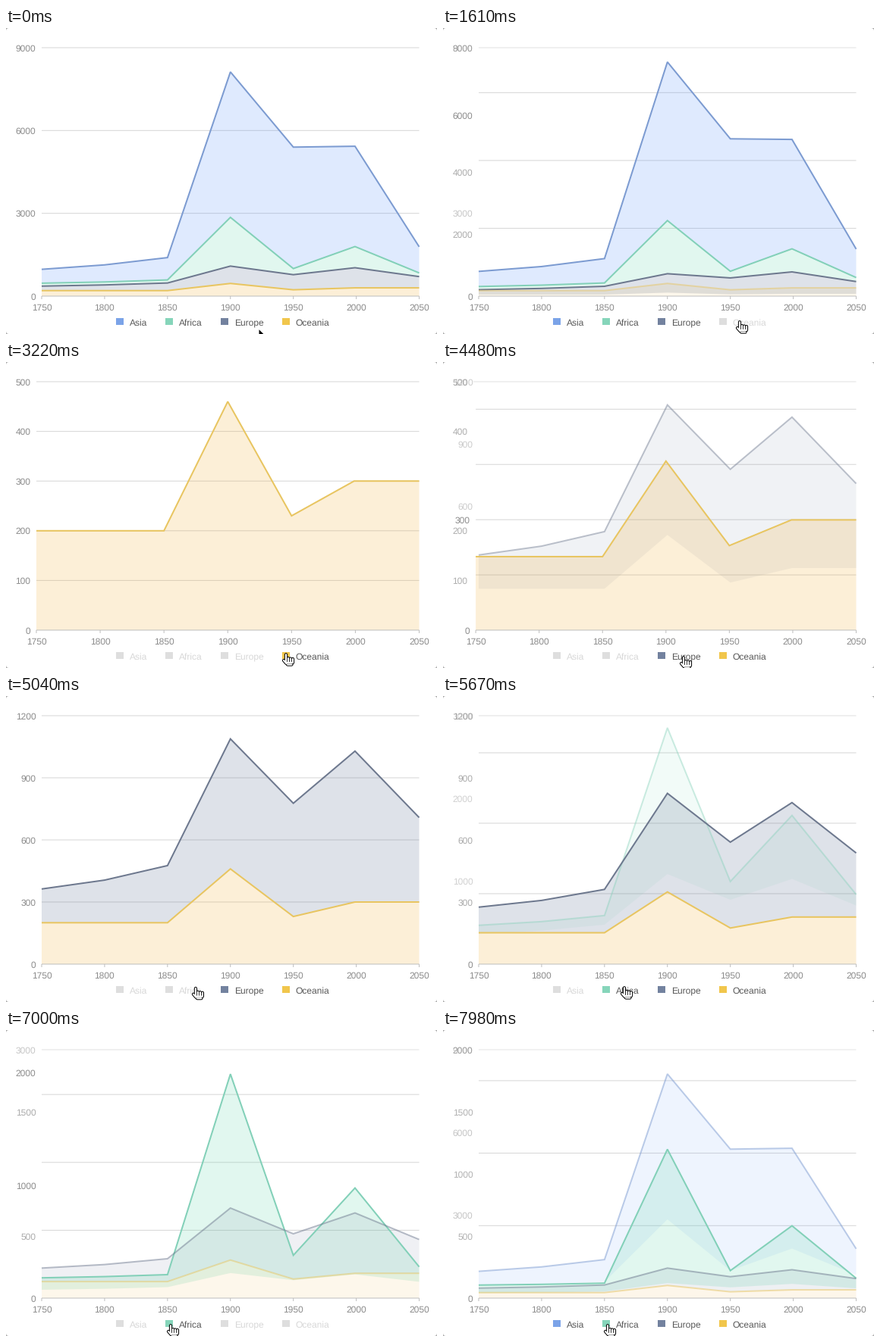
Recreate the animation shown at these times as a matplotlib script. Size 568 px wide and 404 px high, loop 8 s.

```python
import matplotlib.pyplot as plt
import numpy as np
from matplotlib.animation import FuncAnimation
from matplotlib.patches import FancyBboxPatch, Polygon, Rectangle

W, H, DPI = 568, 404, 100
PX = 72 / DPI
LOOP, INTERVAL, STEP = 8000, 20, 70
TOP, BOTTOM, RIGHT = 26, 354, 544.5
MORPH = 635  # duration of one chart transition in ms

plt.rcParams["font.family"] = "Liberation Sans"
plt.rcParams["text.hinting"] = "none"
fig = plt.figure(figsize=(W / DPI, H / DPI), dpi=DPI, facecolor="#a8a8a8")
ax = fig.add_axes([0, 0, 1, 1])
ax.set(xlim=(0, W), ylim=(H, 0))
ax.axis("off")


def growth(first, third, *later):
    """Slowly accelerating start, then the given values."""
    start = first + (third - first) * np.linspace(0, 1, 3) ** 1.4
    return np.r_[start, later]


YEARS = np.r_[1750:1951:50, 1999, 2050]
VALUES = {
    "Asia": growth(502, 809, 5268, 4400, 3634, 947),
    "Africa": growth(106, 111, 1766, 221, 767, 133),
    "Europe": growth(163, 276, 628, 547, 729, 408),
    "Oceania": growth(200, 200, 460, 230, 300, 300),
}
NAMES = list(VALUES)
SWATCH = dict(zip(NAMES, ["#7ba3e8", "#86d5ba", "#73829f", "#f1c64c"]))
LINE = dict(zip(NAMES, ["#7c9bd1", "#82d0b8", "#6d788e", "#e8c560"]))
FILL = dict(zip(NAMES, ["#5f98fd", "#6cdab0", "#5d7092", "#f0af3a"]))


def nice_axis(peak):
    """Smallest round (step, count) with 3 to 5 steps that reaches the peak."""
    options = [(digit * 10 ** power, count) for digit in (1, 2, 3, 5)
               for power in (2, 3) for count in (3, 4, 5)]
    return min((o for o in options if o[0] * o[1] >= peak),
               key=lambda o: o[0] * o[1])


class View:
    """One settled chart: visible series with their pixel outlines and axis."""

    def __init__(self, visible):
        self.visible = visible
        step, count = nice_axis(max(sum(VALUES[n] for n in visible)))
        self.ticks = [step * i for i in range(count + 1)]
        self.left = 47 if self.ticks[-1] >= 1000 else 40
        xs = self.left + (RIGHT - self.left) * (YEARS - 1750) / 300
        self.shapes = {}
        base = np.zeros(len(YEARS))
        for name in reversed(visible):
            upper = base + VALUES[name]
            self.shapes[name] = np.array([xs, self.y(upper), self.y(base)])
            base = upper

    def y(self, value):
        return BOTTOM - (BOTTOM - TOP) * value / self.ticks[-1]

    def grid(self):
        return {i: np.array([self.left, self.y(v)])
                for i, v in enumerate(self.ticks) if i}

    def labels(self):
        return {v: np.array([self.left - 7.5, self.y(v)]) for v in self.ticks}


# (pointer arrives, chart reacts, pointer tip, series left visible)
CLICKS = [
    (800, 1211, (391, 387), NAMES[:3]),
    (2200, 2475, (369, 385), NAMES[3:]),
    (4130, 4180, (317, 389), NAMES[2:]),
    (5110, 5385, (239, 384), NAMES[1:]),
    (6510, 6602, (217, 389), NAMES[1:2]),
    (7600, 7662, (217, 389), NAMES),
]
TRAVEL = 500
POINTER_START = (333, 397)
TIMELINE = [(-MORPH, View(NAMES))] + [(c[1], View(c[3])) for c in CLICKS]


def lerp(a, b, p):
    return a + (b - a) * p


def ease_in_out(u):
    return 2 * u * u if u < 0.5 else 1 - 2 * (1 - u) ** 2


def stroke(xs, ys, color, width=1, alpha=1, z=1, cap="butt"):
    ax.plot(xs, ys, color=color, lw=width * PX, alpha=alpha, zorder=z,
            solid_capstyle=cap, solid_joinstyle="miter", snap=False)


def text(x, y, s, color="#8c8c8c", alpha=1, ha="center"):
    return ax.text(x, y + 4.4, s, color=color, alpha=alpha, ha=ha,
                   va="baseline", fontsize=12 * PX, zorder=5)


def legend_spans():
    spans, x = {}, 145
    for name in NAMES:
        end = x + 18 + text(0, 0, name).get_window_extent().width
        spans[name] = (x, end)
        x = end + 24
    return spans


LEGEND = legend_spans()


def tween(old, new, p, fade):
    """Yield (key, value, alpha) for every key of two dicts of arrays."""
    for key in sorted(old.keys() | new.keys()):
        if key not in new:
            yield key, old[key], fade
        elif key not in old:
            yield key, new[key], p
        else:
            yield key, lerp(old[key], new[key], p), 1


def draw_axes(old, new, p, fade):
    for _, (x, y), alpha in tween(old.grid(), new.grid(), p, fade):
        stroke([x, RIGHT], [y, y], "#d6d6d6", alpha=alpha)
    for value, (x, y), alpha in tween(old.labels(), new.labels(), p, fade):
        text(x, y, str(value), alpha=alpha, ha="right")

    left = lerp(old.left, new.left, p)
    stroke([left, RIGHT], [BOTTOM, BOTTOM], "#bebebe", z=4)
    for i in range(7):
        x = lerp(left, RIGHT, i / 6)
        stroke([x, x], [BOTTOM, BOTTOM + 4], "#bebebe", z=4)
        text(x, 368, str(1750 + 50 * i))


def draw_series(old, new, p, fade):
    for name, (xs, upper, lower), alpha in tween(old.shapes, new.shapes, p, fade):
        outline = np.column_stack([np.r_[xs, xs[::-1]],
                                   np.r_[upper, lower[::-1]]])
        depth = NAMES.index(name) / 10
        ax.add_patch(Polygon(outline, fc=FILL[name], lw=0,
                             alpha=0.2 * alpha, zorder=2 + depth))
        stroke(xs, upper, LINE[name], 2, alpha, 3 + depth)


def draw_legend(visible):
    for name, (x, _) in LEGEND.items():
        on = name in visible
        ax.add_patch(Rectangle((x, 383), 10, 9, lw=0, zorder=5,
                               fc=SWATCH[name] if on else "#dedede"))
        text(x + 18, 388, name, "#595959" if on else "#d8d8d8", ha="left")


def draw_hand(x, y):
    """Four fingers, thumb and palm: white strokes over wider black ones."""
    parts = [((3 * i, 3 * i), (1.2 if i == 0 else 5.5 + i / 2, 12))
             for i in range(4)]
    parts += [((-3, 0.5), (9, 13)), ((1, 8), (12, 12)), ((2, 7.5), (14.5, 14.5))]
    for color, width, z in (("black", 4.2, 8), ("white", 2.2, 9)):
        for xs, ys in parts:
            stroke(np.add(xs, x), np.add(ys, y), color, width, z=z, cap="round")


def draw_pointer(t):
    x, y = POINTER_START
    for arrive, _, tip, _ in CLICKS:
        u = np.clip((t - arrive + TRAVEL) / TRAVEL, 0, 1)
        x, y = lerp(x, tip[0], u), lerp(y, tip[1], u)
    if y < 395 and any(a - 4 <= x <= b for a, b in LEGEND.values()):
        draw_hand(x, y)
    else:
        ax.add_patch(Polygon([(x, y), (x, y + 14), (x + 10, y + 10)],
                             fc="black", ec="white", lw=PX, zorder=8))


def draw_scene(t):
    for artist in [*ax.lines, *ax.patches, *ax.texts]:
        artist.remove()
    ax.add_patch(FancyBboxPatch((4, 4), W - 8, H - 8, fc="white", lw=0, zorder=0,
                                boxstyle="round,pad=4,rounding_size=4"))
    now = max(i for i, (start, _) in enumerate(TIMELINE) if start <= t)
    start, new = TIMELINE[now]
    old = TIMELINE[max(now - 1, 0)][1]
    u = min(1, (t - start) / MORPH)
    p = ease_in_out(u)
    fade = 1 - min(1, u * 8 / 7) ** 2
    draw_axes(old, new, p, fade)
    draw_series(old, new, p, fade)
    draw_legend(new.visible)
    draw_pointer(t)


shown = None


def update(frame):
    global shown
    t = (frame * INTERVAL + INTERVAL // 2) // STEP * STEP
    if t != shown:
        draw_scene(t)
        shown = t
    return []


anim = FuncAnimation(fig, update, frames=LOOP // INTERVAL, interval=INTERVAL,
                     repeat=True, repeat_delay=0, blit=False)
plt.show()
```
